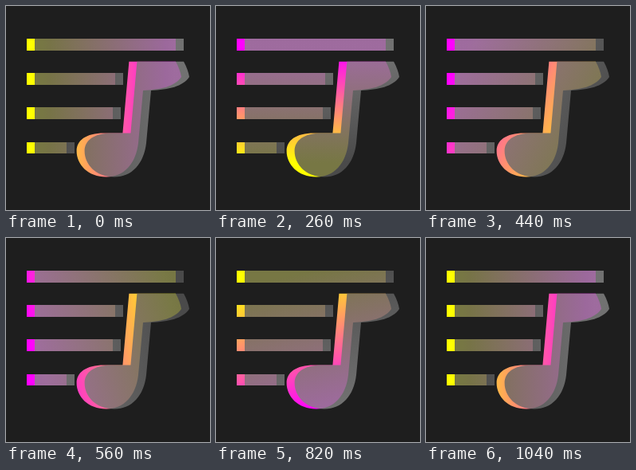
An HTML page with a canvas that plays this animation: 256 px wide and 256 px high, repeating every 1060 ms.

```html
<!DOCTYPE html>
<html lang="en">
<head>
<meta charset="utf-8">
<title>Playlist icon</title>
<style>
  html, body { margin: 0; width: 100%; height: 100%; overflow: hidden; background: #1e1e1e; }
  canvas { display: block; }
</style>
</head>
<body>
<canvas id="stage" width="256" height="256"></canvas>
<script>
const ctx = document.getElementById('stage').getContext('2d');

const LOOP = 1060, STEP = 20;
const BOX = { x: 26, y: 41, w: 194, h: 173 };
const SPREAD = 0.8; // gradient length relative to the box seen at that angle
const OFFSET = 10;

const icon = new Path2D(
  'M154.4 69.7H213C217 77 219 83 220 89C212 101 194 105 172 106' +
  'L166 172C163 198 148 214.5 126 214.5C103 214.5 88.6 199 88.6 182' +
  'C88.6 169 100 159.6 123 159.6H146.4Z');
const bars = [[41, 187, 15], [84, 111, 15], [127, 108, 15], [171, 50, 14]];
bars.forEach(([y, w, h]) => icon.rect(26, y, w, h));

// Linear gradient through the box centre, scaled to the box extent at that angle.
function turned(angle, from, to) {
  const c = Math.cos(angle), s = Math.sin(angle);
  const half = SPREAD / 2 * (BOX.w * Math.abs(c) + BOX.h * Math.abs(s));
  const cx = BOX.x + BOX.w / 2, cy = BOX.y + BOX.h / 2;
  const g = ctx.createLinearGradient(cx - c * half, cy + s * half, cx + c * half, cy - s * half);
  g.addColorStop(0, from);
  g.addColorStop(1, to);
  return g;
}

function draw(now) {
  const step = Math.floor(now % LOOP / STEP);
  const angle = step / (LOOP / STEP - 1) * 2 * Math.PI;

  ctx.fillStyle = '#1e1e1e';
  ctx.fillRect(0, 0, 256, 256);

  ctx.fillStyle = turned(angle, '#ff0', '#f0f');
  ctx.fill(icon);

  ctx.save();
  ctx.translate(OFFSET, 0);
  ctx.globalAlpha = 0.8;
  ctx.fillStyle = turned(angle, '#555', '#868686');
  ctx.fill(icon);
  ctx.restore();
}

const start = performance.now();
function tick() {
  draw(performance.now() - start);
  requestAnimationFrame(tick);
}
tick();
</script>
</body>
</html>
```
